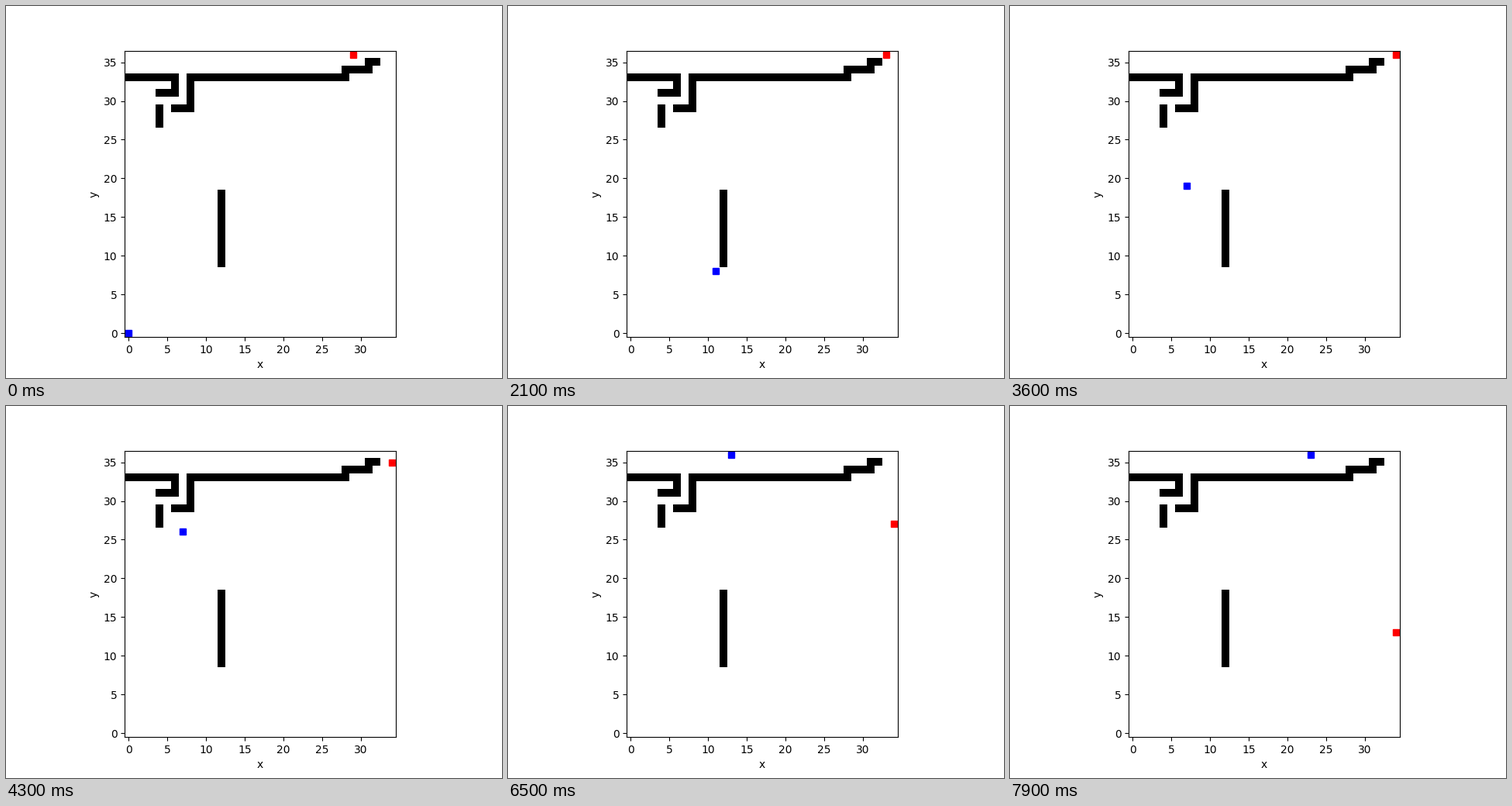
A matplotlib script that plays this animation: 640 px wide and 480 px high, repeating every 8 s.

```python
import numpy as np
import matplotlib.pyplot as plt
from matplotlib.animation import FuncAnimation

W, H = 35, 37
FRAMES = 80
STEP = {"R": (1, 0), "L": (-1, 0), "U": (0, 1), "D": (0, -1)}

# Wall segments: x0, y0, x1, y1 (inclusive cells)
WALLS = [
    (0, 33, 6, 33), (6, 31, 6, 33), (4, 31, 6, 31), (4, 27, 4, 29),
    (6, 29, 8, 29), (8, 29, 8, 33), (8, 33, 28, 33), (28, 34, 31, 34),
    (31, 35, 32, 35), (12, 9, 12, 18),
]
ROUTE = ("R12 U8 L4 U8 L1 U10 L1 U1 L1 U3 R2 U6 R5 "
         "D1 R1 U1 R1 D1 R1 U1 R1 D1 R1 U1 R6")


def build_grid():
    grid = np.zeros((H, W))
    for x0, y0, x1, y1 in WALLS:
        grid[y0:y1 + 1, x0:x1 + 1] = 1
    return grid


def chaser_path():
    path = [(0, 0)]
    for leg in ROUTE.split():
        dx, dy = STEP[leg[0]]
        for _ in range(int(leg[1:])):
            x, y = path[-1]
            path.append((x + dx, y + dy))
    return path


def runner_path(grid, chaser):
    """Each step goes to the free neighbour farthest from the chaser."""
    path = [(29, 36)] * 2
    for cx, cy in chaser[1:FRAMES - 1]:
        x, y = path[-1]
        options = [(x + dx, y + dy) for dx, dy in STEP.values()]
        free = [(a, b) for a, b in options
                if 0 <= a < W and 0 <= b < H and not grid[b, a]]
        path.append(max(free, key=lambda p: (p[0] - cx) ** 2 + (p[1] - cy) ** 2))
    return path


grid = build_grid()
chaser = chaser_path()
runner = runner_path(grid, chaser)

fig, ax = plt.subplots(figsize=(6.4, 4.8), dpi=100)
ax.imshow(grid, cmap="binary", origin="lower", interpolation="nearest")
ax.set_xticks(range(0, W - 1, 5))
ax.set_yticks(range(0, H, 5))
ax.set_xlabel("x")
ax.set_ylabel("y")
blue, = ax.plot([0], [0], "sb")
red, = ax.plot([29], [36], "sr")
ax.set_xlim(-0.5, W - 0.5)
ax.set_ylim(-0.5, H - 0.5)


def update(i):
    for dot, (x, y) in ((blue, chaser[i]), (red, runner[i])):
        dot.set_data([x], [y])
    return blue, red


anim = FuncAnimation(fig, update, frames=FRAMES, interval=100, repeat=True)
plt.show()
```
